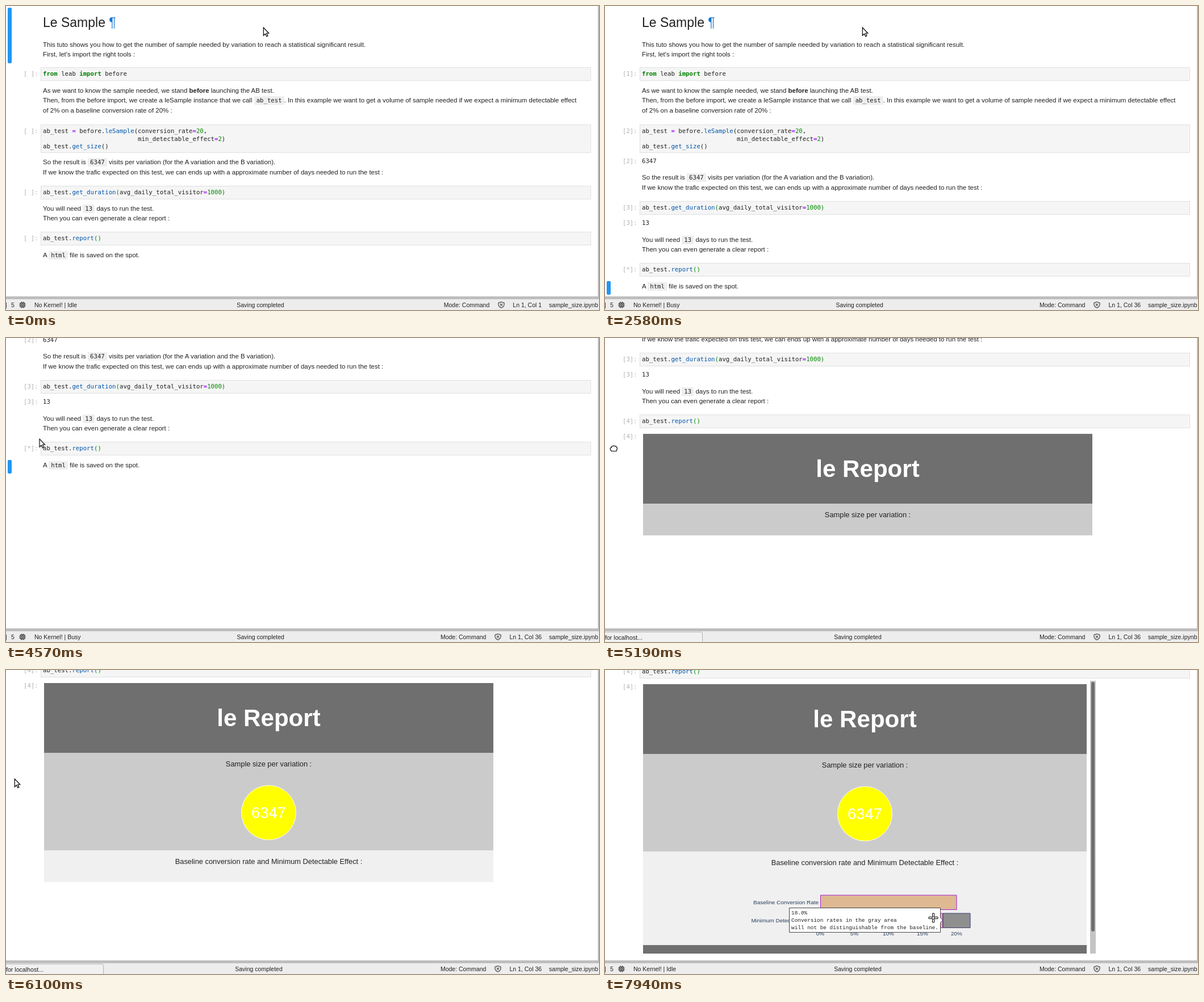
An HTML page that plays this animation: 1044x536 px, repeating every 8000 ms.

```html
<!DOCTYPE html>
<html lang="en">
<head>
<meta charset="utf-8">
<title>Notebook run</title>
<style>
  html, body { margin: 0; width: 100%; height: 100%; overflow: hidden; background: #fff; }
  body { position: relative; font: 11.47px/17.7px "Liberation Sans", Arial, sans-serif; color: #212121; }
  #view { position: absolute; left: 0; top: 0; width: 1042px; height: 512px; overflow: hidden; }
  #edge { position: absolute; left: 1042px; top: 0; width: 2px; height: 512px; background: #bdbdbd; }
  #doc { position: absolute; inset: 0; animation: scroll 8s linear infinite; }
  .shift { position: absolute; left: 0; width: 100%; top: 0; }
  .cell, .out { position: absolute; left: 0; width: 1042px; white-space: pre; }
  .cell.on::before { content: ""; position: absolute; left: 3px; top: 0; width: 7px; height: 100%; border-radius: 2px; background: #2196f3; }
  .md > p { position: absolute; left: 65px; top: .5px; margin: 0; }
  h1 { position: absolute; left: 65px; top: 10px; margin: 0; font: 23px/32px "Liberation Sans", Arial, sans-serif; }
  h1 a { color: #1976d2; }
  code, pre, .prompt, .out { font: 10.68px/13.6px "DejaVu Sans Mono", monospace; }
  p code { padding: 1px 4px; background: #eee; }
  pre { position: absolute; box-sizing: border-box; left: 61px; top: 0; width: 969px; height: 100%; margin: 0; padding: 4px 3px; border: 1px solid #e0e0e0; background: #f5f5f5; }
  pre b { color: #008000; }
  pre u { color: #a2f; font-weight: bold; text-decoration: none; }
  pre i { color: #05a; font-style: normal; }
  pre s { color: #080; text-decoration: none; }
  .prompt { position: absolute; left: 31px; top: 5px; color: #b3b3b3; }
  .out .prompt { top: 0; }
  .out .value { position: absolute; left: 65px; }

  #frame { position: absolute; left: 61px; top: 426px; width: 803px; height: 481px; overflow: hidden; text-align: center; }
  #report { position: absolute; left: 6px; top: 6px; width: 791px; font-size: 12.85px; }
  #report div { position: relative; height: 56px; }
  #report p { position: absolute; left: 0; right: 0; top: 11px; margin: 0; }
  #report .head { height: 123px; background: #6f6f6f; color: #fff; font: bold 42.1px/124px "Liberation Sans", Arial, sans-serif; }
  .size { background: #cbcbcb; }
  .rate { background: #f0f0f0; }
  #report .foot { background: #6f6f6f; }
  .size span { position: absolute; left: 50%; top: 57px; width: 95px; height: 95px; margin-left: -48.5px; border: 1px solid #fff; border-radius: 50%; background: #ff0; color: #fff; font-size: 27.4px; line-height: 96px; }
  .rate svg { position: absolute; left: 0; top: 0; font-size: 9.95px; }
  #bar { position: absolute; right: 0; top: 0; width: 10px; height: 100%; background: #c4c4c4; }
  #bar::before { content: ""; position: absolute; left: 2px; top: 2px; width: 6px; height: 440px; border-radius: 3px; background: #6e6e6e; }
  [data-rep="0"] { visibility: hidden; }
  [data-rep="1"] .rate, [data-rep="1"] .size span,
  [data-rep="1"] .late, [data-rep="2"] .late { display: none; }
  [data-rep="2"] #report .size, [data-rep="3"] #report .size { height: 172px; }
  [data-rep="3"] #report .rate { height: 165px; }
  [data-rep="3"] #report { width: 781px; }

  #status { position: absolute; box-sizing: border-box; left: 0; top: 512px; width: 1044px; height: 24px; padding: 4px 1.5px 0 0; border-top: 5px solid #bdbdbd; background: #ededed; font-size: 10.5px; line-height: 12px; display: flex; justify-content: space-between; white-space: pre; }
  #status div { display: flex; align-items: center; height: 12px; }
  #status svg { width: 12px; height: 12px; fill: none; stroke: #424242; }
  #tip { position: absolute; box-sizing: border-box; left: -1px; top: 518px; width: 173px; height: 19px; border: 1px solid #b5b5b5; border-radius: 0 3px 0 0; background: #f1f1f1; font-size: 10.6px; line-height: 18px; }
  #cursor { position: absolute; left: 0; top: 0; width: 1px; height: 1px; overflow: visible; fill: #fff; stroke: #000; animation: move 8s linear infinite; }
  #cursor path { display: none; }
  #cursor .on { display: inline; }

  /* Short rests between wheel ticks */
  @keyframes scroll {
    0%, 42.25% { transform: translateY(0); animation-timing-function: ease-out; }
    46.125%, 63.625% { transform: translateY(-270px); }
    64.75%, 65.4% { transform: translateY(-318px); animation-timing-function: cubic-bezier(.25, .4, .5, 1); }
    69.125%, 70.875% { transform: translateY(-580px); }
    72.5%, 73.2% { transform: translateY(-514px); animation-timing-function: ease-out; }
    76.125%, 76.65% { transform: translateY(-464px); }
    76.875%, 100% { transform: translateY(-462px); }
  }
  @keyframes move {
    0%, 51.125% { transform: translate(453px, 38px); animation-timing-function: cubic-bezier(.4, 0, .65, .9); }
    57.125% { transform: translate(59px, 178px); animation-timing-function: ease-out; }
    60.5%, 78.625% { transform: translate(15px, 192px); animation-timing-function: ease-in-out; }
    82%, 87.375% { transform: translate(284px, 257px); animation-timing-function: ease-in-out; }
    96.875% { transform: translate(650px, 408px); }
    97.625% { transform: translate(592px, 431px); animation-timing-function: ease-out; }
    99%, 100% { transform: translate(578px, 437px); }
  }
</style>
</head>
<body>
<div id="view"><div id="doc">
  <div class="cell md" style="top:3px;height:98px"><h1>Le Sample <a>¶</a></h1><p style="top:56.5px">This tuto shows you how to get the number of sample needed by variation to reach a statistical significant result.
First, let's import the right tools :</p></div>
  <div class="cell" style="top:108px;height:24px"><span class="prompt" data-p="p1"></span><pre><b>from</b> leab <b>import</b> before</pre></div>
  <div class="cell md" style="top:140px;height:60px"><p>As we want to know the sample needed, we stand <b>before</b> launching the AB test.
Then, from the before import, we create a leSample instance that we call <code>ab_test</code>. In this example we want to get a volume of sample needed if we expect a minimum detectable effect
of 2% on a baseline conversion rate of 20% :</p></div>
  <div class="cell" style="top:209px;height:50px"><span class="prompt" data-p="p2"></span><pre>ab_test <u>=</u> before.<i>leSample</i>(conversion_rate<u>=</u><s>20</s>,
                          min_detectable_effect<u>=</u><s>2</s>)
ab_test.<i>get_size</i>()</pre></div>
  <div class="out" id="out2" style="top:267px"><span class="prompt" data-p="p2"></span><span class="value">6347</span></div>

  <div class="shift" id="afterSize">
    <div class="cell md" style="top:266.5px;height:42px"><p>So the result is <code>6347</code> visits per variation (for the A variation and the B variation).
If we know the trafic expected on this test, we can ends up with a approximate number of days needed to run the test :</p></div>
    <div class="cell" style="top:317px;height:24px"><span class="prompt" data-p="p3"></span><pre>ab_test.<i>get_duration</i><s>(</s>avg_daily_total_visitor<u>=</u><s>1000)</s></pre></div>
    <div class="out" id="out3" style="top:349px"><span class="prompt" data-p="p3"></span><span class="value">13</span></div>

    <div class="shift" id="afterDays">
      <div class="cell md" style="top:348px;height:42px"><p>You will need <code>13</code> days to run the test.
Then you can even generate a clear report :</p></div>
      <div class="cell" style="top:398px;height:24px"><span class="prompt" data-p="p4"></span><pre>ab_test.<i>report</i><s>()</s></pre></div>
      <div id="result" data-rep="0">
        <div class="out" style="top:430px"><span class="prompt" data-p="p4"></span></div>
        <div id="frame">
          <div id="report">
            <div class="head">le Report</div>
            <div class="size"><p>Sample size per variation :</p><span>6347</span></div>
            <div class="rate"><p>Baseline conversion rate and Minimum Detectable Effect :</p>
              <svg class="late" width="781" height="165" viewBox="67 320 781 165">
                <g fill="#deb992" stroke="#a020d0"><path d="M379.5 397h239.5v25.5h-239.5z"/><path d="M379.5 429h215v25.5h-215z"/></g>
                <path d="M595 429h48v25.5h-48z" fill="#8f8f8f" stroke="#3d4272"/>
                <g fill="#2a3f5f" text-anchor="end"><text x="376" y="412.5">Baseline Conversion Rate</text><text x="376" y="444.5">Minimum Detectable Effect</text></g>
                <g fill="#2a3f5f" text-anchor="middle"><text x="379" y="468">0%</text><text x="439" y="468">5%</text><text x="499" y="468">10%</text><text x="559" y="468">15%</text><text x="619" y="468">20%</text></g>
                <g id="hover" font-family="Liberation Mono, monospace" font-size="9.38" fill="#222">
                  <path d="M324.5 419.5h266v17l4 4.500l-4 4.500v17h-266z" fill="#fff" stroke="#444"/>
                  <text x="328" y="431">18.0%</text><text x="328" y="444">Conversion rates in the gray area</text><text x="328" y="457">will not be distinguishable from the baseline.</text>
                </g>
              </svg>
            </div>
            <div class="foot late"></div>
          </div>
          <div id="bar" class="late"></div>
        </div>
      </div>
      <div class="shift" id="afterReport">
        <div class="cell md" style="top:430px;height:24px"><p>A <code>html</code> file is saved on the spot.</p></div>
      </div>
    </div>
  </div>
</div></div>
<div id="edge"></div>

<div id="status">
  <div><span style="width:9px;text-indent:-1px">|</span><span style="width:14px">5</span><svg viewBox="0 0 12 12" style="margin-right:15px"><path d="M2.500 2.500h7v7h-7zM4.500 4.500h3v3h-3zM4.500 .5v2m3-2v2m-3 7v2m3-2v2M.5 4.500h2m-2 3h2m7-3h2m-2 3h2" stroke-width="1.300"/></svg><span>No Kernel! | <span id="kernel"></span></span></div>
  <div>Saving completed</div>
  <div><span>Mode: Command</span><svg viewBox="0 0 12 12" style="margin:0 14px 0 15px"><path d="M6 .7L11 2.500V5.500Q10.500 9.500 6 11.300Q1.500 9.500 1 5.500V2.500zM4 4l4 4m0-4l-4 4" stroke-width="1.200"/></svg><span id="pos"></span><span style="margin-left:13px">sample_size.ipynb</span></div>
</div>
<div id="tip">for localhost...</div>

<svg id="cursor">
  <path id="arrow" d="M.3 0V14L3.500 11L5.700 15.800L7.900 14.800L5.800 10H9.800Z" stroke-width="1.200"/>
  <path id="hand" d="M-4 7.500Q-4.300 6-5.300 5Q-6.300 3.500-5.500 2Q-5 1-3.800 1.200Q-3.800-1.500-1.800-1.200Q0-2.600 1.400-1.500Q3-2 4-.6Q6.200-.4 6.200 2V4.500Q5.300 6 5 7.500Z" stroke-width="1.200"/>
  <path id="cross" d="M-1.500-8h3v6h-3zM-1.500 2h3v6h-3zM-8-1.500h6v3h-6zM2-1.500h6v3h-6z"/>
</svg>

<script>
  const LOOP = 8000;
  const $ = id => document.getElementById(id);
  const cells = [...document.querySelectorAll('.cell')];
  const prompts = [...document.querySelectorAll('[data-p]')];
  const pointers = ['arrow', 'hand', 'cross'];

  // Each step changes only the listed fields.
  const steps = [
    [0, { sel: 0, pos: 'Ln 1, Col 1', kernel: 'Idle', p1: ' ', p2: ' ', p3: ' ', p4: ' ',
          size: false, days: false, rep: 0, tip: false, hover: false, pointer: 'arrow' }],
    [520, { sel: 1, pos: 'Ln 1, Col 24' }],
    [770, { sel: 2, pos: 'Ln 2, Col 227', p1: '*' }],
    [830, { kernel: 'Busy' }],
    [990, { sel: 3, pos: 'Ln 3, Col 19' }],
    [1350, { sel: 4, pos: 'Ln 2, Col 119', p2: '*' }],
    [1600, { p1: 1 }],
    [1660, { p2: 2, size: true, kernel: 'Idle' }],
    [1730, { sel: 5, pos: 'Ln 1, Col 51' }],
    [1830, { sel: 6, pos: 'Ln 2, Col 44', p3: '*' }],
    [1890, { p3: 3, days: true }],
    [2040, { sel: 7, pos: 'Ln 1, Col 17' }],
    [2520, { sel: 8, pos: 'Ln 1, Col 36', p4: '*' }],
    [2570, { kernel: 'Busy' }],
    [4760, { pointer: 'hand' }],
    [4900, { p4: 4, rep: 1, kernel: 'Idle' }],
    [4950, { tip: true }],
    [5950, { rep: 2, pointer: 'arrow' }],
    [6960, { rep: 3 }],
    [7100, { tip: false }],
    [7660, { pointer: 'cross' }],
    [7900, { hover: true }],
  ];

  const show = (id, on) => { $(id).style.visibility = on ? 'visible' : 'hidden'; };
  const push = (id, px) => { $(id).style.top = px + 'px'; };

  function render(s) {
    cells.forEach((c, i) => c.classList.toggle('on', i === s.sel));
    prompts.forEach(p => { p.textContent = `[${s[p.dataset.p]}]:`; });
    pointers.forEach(id => $(id).classList.toggle('on', id === s.pointer));
    $('kernel').textContent = s.kernel;
    $('pos').textContent = s.pos;
    $('result').dataset.rep = s.rep;
    show('out2', s.size);
    show('out3', s.days);
    show('tip', s.tip);
    show('hover', s.hover);
    push('afterSize', s.size ? 27 : 0);
    push('afterDays', s.days ? 28 : 0);
    push('afterReport', s.rep ? 496 : 0);
  }

  let start, shown;
  function frame(now) {
    start ??= now;
    const t = (now - start) % LOOP;
    const past = steps.filter(([at]) => at <= t);
    if (past.length !== shown) {
      shown = past.length;
      render(Object.assign({}, ...past.map(([, change]) => change)));
    }
    requestAnimationFrame(frame);
  }
  render(steps[0][1]);
  requestAnimationFrame(frame);
</script>
</body>
</html>
```
